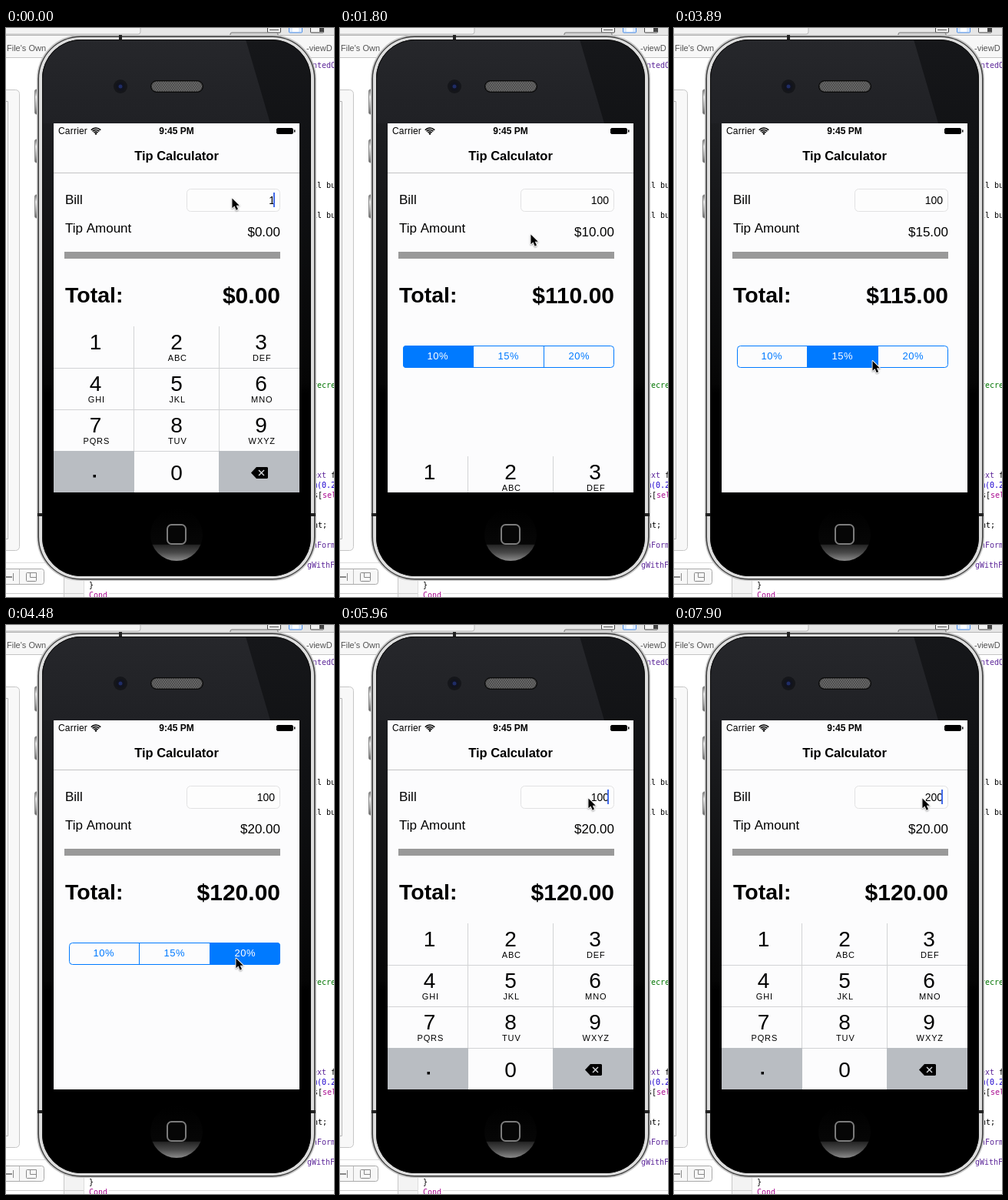
These frames come from a looping animation (427 by 740 pixels, 8000 ms). An HTML page with a canvas:

```html
<!DOCTYPE html>
<html lang="en">
<head>
<meta charset="utf-8">
<title>Tip Calculator</title>
<style>
  html, body { margin: 0; width: 100%; height: 100%; overflow: hidden; background: #fff; }
  canvas { display: block; width: 427px; height: 740px; }
</style>
</head>
<body>
<canvas id="stage" width="427" height="740"></canvas>
<script>
const ctx = document.getElementById('stage').getContext('2d');
const SANS = '"Liberation Sans", Arial, sans-serif';
const MONO = '"DejaVu Sans Mono", monospace';
const BLUE = '#007aff';
const LOOP = 8000;

function rect(x, y, w, h, color) {
  ctx.fillStyle = color;
  ctx.fillRect(x, y, w, h);
}

function rounded(x, y, w, h, r, fill, stroke, width = 1) {
  ctx.beginPath();
  ctx.roundRect(x, y, w, h, r);
  if (fill) { ctx.fillStyle = fill; ctx.fill(); }
  if (stroke) { ctx.strokeStyle = stroke; ctx.lineWidth = width; ctx.stroke(); }
}

function circle(x, y, r, fill) {
  ctx.beginPath();
  ctx.arc(x, y, r, 0, Math.PI * 2);
  ctx.fillStyle = fill;
  ctx.fill();
}

function polygon(points, fill) {
  ctx.beginPath();
  points.forEach(([x, y]) => ctx.lineTo(x, y));
  ctx.closePath();
  ctx.fillStyle = fill;
  ctx.fill();
}

function line(x1, y1, x2, y2, color, width = 1) {
  ctx.beginPath();
  ctx.moveTo(x1, y1);
  ctx.lineTo(x2, y2);
  ctx.strokeStyle = color;
  ctx.lineWidth = width;
  ctx.stroke();
}

function text(str, x, y, size, { align = 'left', color = '#000', bold = false, family = SANS, spacing = 0 } = {}) {
  ctx.font = `${bold ? 'bold ' : ''}${size}px ${family}`;
  ctx.textAlign = align;
  ctx.letterSpacing = spacing + 'px';
  ctx.fillStyle = color;
  ctx.fillText(str, x, y);
}

function verticalGradient(y1, y2, ...stops) {
  const g = ctx.createLinearGradient(0, y1, 0, y2);
  stops.forEach(([at, color]) => g.addColorStop(at, color));
  return g;
}

const ticks = [];
const shortTicks = [3290, 4180, 5670, 5960, 7900];
for (let t = 0; t < LOOP; t += shortTicks.includes(t + 140) ? 140 : 150) ticks.push(t);

const latest = (list, t) => list.findLast(([start]) => start <= t)[1];

const billSteps = [[0, '1'], [150, '10'], [300, '100'], [6260, '10'], [6560, '1'],
  [6710, ''], [7160, '2'], [7760, '20'], [7900, '200']];
const tipSteps = [[0, 0], [1650, 10], [3290, 15], [4480, 20]];
const selectedSteps = [[0, 0], [3290, 1], [4480, 2]];
const pressedSteps = [[0, -1], [3150, 1], [3290, -1], [4330, 2], [4480, -1]];

const pointerMoves = [
  [750, 1500, [294, 221], [248, 268]],
  [1800, 3000, [248, 268], [215, 432]],
  [3590, 4180, [215, 432], [299, 433]],
  [4630, 5230, [299, 433], [323, 225]]
];

function pointerAt(t) {
  const [start, end, from, to] = pointerMoves.findLast(m => m[0] <= t) || pointerMoves[0];
  const p = Math.min(1, Math.max(0, (t - start) / (end - start)));
  const eased = p * p * (3 - 2 * p);
  return from.map((v, i) => v + (to[i] - v) * eased);
}

// Critically damped spring: share of the travel still left.
function springLeft(ms) {
  const k = Math.max(0, ms) * 0.0192;
  return (1 + k) * Math.exp(-k);
}

function keyboardOffset(t) {
  const left = t < 5501 ? 1 - springLeft(t - 1650) : springLeft(t - 5501);
  return Math.round(216 * left);
}

// ---- Desktop behind the phone
function drawDesktop() {
  rect(0, 0, 427, 740, '#fff');
  rect(0, 0, 427, 9, '#e6e6e6');
  rounded(-10, -10, 185, 18, 3, '#f3f3f3', '#b8b8b8');
  line(0, 9.5, 427, 9.5, '#b5b5b5');
  rect(0, 10, 427, 28, '#f7f7f7');
  line(0, 38.5, 427, 38.5, '#c4c4c4');
  rounded(340.5, -6, 17, 12, 1, '#f4f4f4', '#444');
  line(343, 2.5, 355, 2.5, '#444');
  rounded(368.5, -6, 17, 12, 1, '#dbe9fb', '#4b8ee8');
  rect(373, 0, 8, 5, '#fff');
  rounded(396.5, -6, 17, 12, 1, '#f4f4f4', '#444');
  rect(408, 0, 5, 5, '#444');
  text("File's Own", 1, 30, 11, { color: '#555' });
  text('-viewD', 391, 30, 11, { color: '#555' });

  rounded(-20, 80.5, 37.5, 599, 5, '#f8f8f8', '#c6c6c6');
  rect(-1, 95, 4, 570, '#fff');
  rounded(-20, 95.5, 22.5, 569, 0, null, '#b5b5b5');
  line(0, 695.5, 75, 695.5, '#ddd');
  rounded(-10, 703.5, 59.5, 20, 3, '#f7f7f7', '#aaa');
  line(17.5, 704, 17.5, 723, '#bbb');
  line(0, 714, 8, 714, '#888', 2);
  line(9.5, 709, 9.5, 719, '#888');
  rounded(26.5, 708.5, 13, 11, 1, null, '#888');
  rounded(31.5, 708.5, 8, 6, 0, null, '#888');
  rect(75, 700, 27, 40, '#f3f3f3');
  line(75.5, 700, 75.5, 740, '#c8c8c8');
  line(101.5, 700, 101.5, 740, '#ddd');
  line(0, 735.5, 101, 735.5, '#ccc');

  const code = (str, x, y, color = '#000') => text(str, x, y, 10, { color, family: MONO });
  const purple = '#5c2699';
  code('ntedO', 399, 52, purple);
  code('il bu', 399, 208);
  code('il bu', 399, 247);
  code('recre', 399, 468, '#007400');
  code('ext', 399, 585, purple);
  code('f', 423, 585);
  code('@(0.2', 399, 598, '#1c00cf');
  code('s[', 400, 611);
  code('sel', 412, 611, '#aa0d91');
  code('nt;', 400, 650);
  code('nForm', 399, 676, purple);
  code('gWithF', 392, 702, purple);
  code('}', 108, 728);
  code('Cond', 108, 741, '#aa0d91');
  line(134, 735.5, 427, 735.5, '#ddd');
}

// ---- Phone
function drawPhone() {
  for (const [y, h] of [[80, 32], [145, 30], [217, 30]]) {
    rounded(37.5, y, 8, h, 2, verticalGradient(y, y + h, [0, '#777'], [0.3, '#eee'], [0.7, '#aaa'], [1, '#666']), '#888');
  }
  rounded(292, 6, 62, 6, 2, '#d5d5d5', '#777');

  rounded(40, 9, 364, 710, 57, '#c4c4c4');
  rounded(41.5, 10.5, 361, 707, 56, '#3a3a3a');
  rounded(43, 12, 358, 704, 54, '#dedede');
  rect(147, 9, 4, 6, '#222');
  rect(41, 631, 6, 4, '#222');
  rect(397, 631, 6, 4, '#222');

  // Glass: a lighter sheen left of a slanted edge.
  rounded(47, 15, 350, 698, 51,
    verticalGradient(15, 713, [0, '#16171a'], [0.3, '#0f1012'], [0.64, '#050505'], [0.66, '#000'], [1, '#000']));
  ctx.save();
  ctx.clip();
  polygon([[47, 15], [312, 15], [344, 124], [47, 124]],
    verticalGradient(15, 124, [0, '#26272b'], [1, '#202125']));
  rect(47, 124, 15, 340, verticalGradient(124, 464, [0, '#1d1e21'], [1, '#050505']));
  ctx.restore();
  rounded(47.5, 15.5, 349, 697, 50, null, '#0c0c0c');

  circle(149, 76, 9, '#15161a');
  circle(149, 76, 5.5, '#11131f');
  circle(149, 76, 2.5, '#1f2c66');

  rounded(188.5, 68.5, 68, 15, 7.5, '#161616', '#0a0a0a');
  ctx.save();
  ctx.beginPath();
  ctx.roundRect(189.5, 69.5, 66, 13, 6.5);
  ctx.clip();
  rect(189, 69, 67, 14, '#4a4a4a');
  for (let row = 0; row < 7; row++)
    for (let x = 189 + row % 2 * 1.5; x < 256; x += 3) rect(x, 69.5 + row * 2, 1.5, 1, '#8c8c8c');
  ctx.restore();

  circle(222, 659, 34, verticalGradient(625, 693,
    [0, '#000'], [0.68, '#060606'], [0.7, '#262626'], [0.84, '#484848'], [1, '#8a8a8a']));
  rounded(210, 646, 24, 25, 5.5, '#060606', '#7c7c7c', 2);
}

// ---- App screen
function drawStatusBar() {
  text('Carrier', 68, 138, 12, { spacing: 0.2 });
  for (const r of [3.5, 6, 8.5]) {
    ctx.beginPath();
    ctx.arc(117, 138.5, r, -Math.PI * 0.76, -Math.PI * 0.24);
    ctx.strokeStyle = '#000';
    ctx.lineWidth = 1.6;
    ctx.stroke();
  }
  circle(117, 137.5, 1.3, '#000');
  text('9:45 PM', 222, 138, 12, { bold: true, align: 'center' });
  rounded(352.5, 130.5, 21, 7, 1.5, '#000', '#000');
  rect(375, 132.5, 1.5, 3, '#000');
}

function drawSegments(selected, pressed) {
  ctx.save();
  ctx.beginPath();
  ctx.roundRect(82, 413, 275, 29, 4);
  ctx.clip();
  const edges = [82, 173.5, 265.5, 357];
  ['10%', '15%', '20%'].forEach((label, i) => {
    const width = edges[i + 1] - edges[i];
    if (i === selected) rect(edges[i], 413, width, 29, BLUE);
    else if (i === pressed) rect(edges[i], 413, width, 29, '#d4e7fe');
    text(label, 127.3 + 92 * i, 431, 13, { align: 'center', color: i === selected ? '#fff' : BLUE, spacing: 0.5 });
  });
  ctx.restore();
  rounded(82.5, 413.5, 274, 28, 4, null, BLUE);
  for (const x of [173.5, 265.5]) line(x, 413, x, 442, BLUE);
}

function drawKeyboard(offset) {
  const letters = ['', 'ABC', 'DEF', 'GHI', 'JKL', 'MNO', 'PQRS', 'TUV', 'WXYZ'];
  const centers = [116.5, 222, 332];
  ctx.save();
  ctx.translate(0, offset);
  rect(62, 388, 320, 216, '#fcfcfd');
  for (const y of [442.5, 496.5, 550.5]) line(62, y, 382, y, '#d2d3d5');
  for (const x of [166.5, 277.5]) line(x, 388, x, 604, '#d2d3d5');
  rect(62, 550, 105, 54, '#b9bdc2');
  rect(277, 550, 105, 54, '#b9bdc2');
  letters.forEach((label, i) => {
    const x = centers[i % 3], y = 388 + 54 * Math.floor(i / 3);
    text(String(i + 1), x, y + 30, 28, { align: 'center' });
    text(label, x + 1.3, y + 45, 11, { align: 'center', spacing: 0.9 });
  });
  text('0', 222, 588, 28, { align: 'center' });
  rect(113.5, 581, 3.5, 3.5, '#000');

  polygon([[319, 578.5], [326, 571], [340, 571], [341, 572], [341, 585], [340, 586], [326, 586]], '#000');
  line(329, 575, 336, 582, '#d5d8db', 1.4);
  line(336, 575, 329, 582, '#d5d8db', 1.4);
  ctx.restore();
}

function drawPointer(x, y) {
  ctx.save();
  ctx.translate(x, y);
  ctx.scale(0.88, 0.88);
  const arrow = [[0.5, 0.5], [0.5, 15], [3.9, 11.9], [6.5, 17.8], [9.1, 16.6], [6.6, 11], [11.1, 11]];
  ctx.shadowColor = 'rgba(0,0,0,0.3)';
  ctx.shadowBlur = 2;
  ctx.shadowOffsetY = 1;
  polygon(arrow, '#fff');
  ctx.strokeStyle = '#fff';
  ctx.lineWidth = 2;
  ctx.lineJoin = 'round';
  ctx.stroke();
  ctx.shadowColor = 'transparent';
  polygon(arrow, '#000');
  ctx.restore();
}

function drawScreen(t) {
  const tip = latest(tipSteps, t);
  const editing = t < 1650 || t >= 5530;
  ctx.save();
  ctx.beginPath();
  ctx.rect(62, 124, 320, 480);
  ctx.clip();
  rect(62, 124, 320, 480, '#fcfcfd');
  drawStatusBar();
  text('Tip Calculator', 222, 172, 16.5, { bold: true, align: 'center' });
  line(62, 188.5, 382, 188.5, '#c3c3c4');

  text('Bill', 77, 229, 17);
  rounded(235.5, 209.5, 121, 29, 5, '#fdfdfd', '#e2e2e3');
  text(latest(billSteps, t), 350, 229, 14, { align: 'right' });
  if (editing) rect(348, 214, 2, 19, '#4169e8');

  text('Tip Amount', 77, 266, 17);
  text('$' + tip.toFixed(2), 357, 271, 17, { align: 'right' });
  rect(76, 291, 281, 9, '#999');
  text('Total:', 77, 357, 28.5, { bold: true });
  text('$' + (tip && 100 + tip).toFixed(2), 357, 358, 30, { bold: true, align: 'right' });

  drawSegments(latest(selectedSteps, t), latest(pressedSteps, t));
  drawKeyboard(keyboardOffset(t));
  drawPointer(...pointerAt(t));
  ctx.restore();
}

function frame() {
  const now = performance.now() % LOOP;
  drawDesktop();
  drawPhone();
  drawScreen(ticks.findLast(t => t <= now));
  requestAnimationFrame(frame);
}
frame();
</script>
</body>
</html>
```
